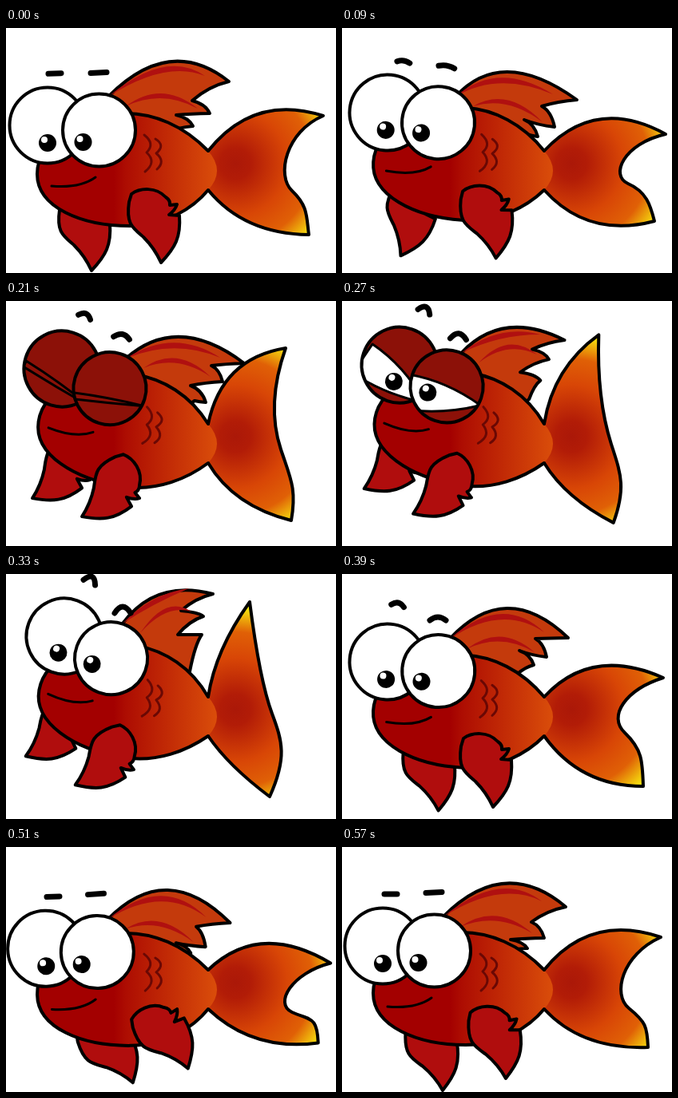
Write an HTML page with a canvas that moves like this. It is 413 by 307 pixels and loops after 600 ms.

```html
<!DOCTYPE html>
<html>
<head>
<meta charset="utf-8">
<title>Swimming fish</title>
<style>
html, body { margin: 0; width: 100%; height: 100%; overflow: hidden; background: #fff; }
canvas { display: block; }
</style>
</head>
<body>
<canvas id="stage" width="413" height="307"></canvas>
<script>
const ctx = document.getElementById('stage').getContext('2d');
const LOOP = 600, STEP = 30;
const times = [0, 90, 210, 330, 390, 450, 570];
const rows = text => text.trim().split('\n').map(r => r.trim().split(/\s+/).map(Number));

// One row per key time.
// body angle, mouth y | eyes x y angle | brow x y angle, twice | brow bend
const face = rows(`
  0   197  52   122   0   61 57 -2  116 56 -3  0
  4   181  57   106   6   77 42  8  131 48 10  2
  8.5 166  70    85  17   99 18 22  145 44 10  5
  10  159  73    78  20  106  7 25  146 45  0  8
  3   187  57   110   5   70 38 12  120 56  0  4
  -1  203  49   129  -3   57 64 -5  111 60 -5  0
  0   199  51   124   0   61 59  0  115 57 -3  0`);
// near fin x y angle, far fin x y angle
const fins = rows(`
  185 225   0   98 235   0
  180 220  -3   91 218  22
  148 225  57   86 202  57
  142 222  60   80 186  60
  180 223   0  108 228  -3
  189 218 -40  125 237 -40
  190 222  -5  111 237  -5`);
// start, crest, then tip and notch in turn, end
const dorsal = rows(`
  128 86  205  8  279  67  233  91  255 107  213 109  234 123  216 126
  142 86  200 22  294  90  250  98  266 124  228 115  245 136  231 133
  150 72  215 15  298  78  257  81  271 101  231 106  250 127  236 125
  146 62  187  6  259  25  219  46  247  53  215  76  245  76  230 122
  134 82  205  5  283  80  242  81  256 104  222  96  240 114  220 125
  130 92  200 18  281 107  239 103  248 131  216 122  231 136  224 134
  126 88  203 10  280  75  237  94  253 114  211 116  232 127  218 128`);
// upper bend, upper tip, rear edge, lower tip, lower bend
const tail = rows(`
  310  82  397 110  350 130  338 185  358 204  376 236  379 259  298 258
  318  85  405 133  352 145  335 185  358 195  386 222  391 242  308 264
  270  72  350  59  332 110  332 150  344 186  364 235  357 275  285 257
  262  95  305  35  312  90  320 140  333 175  352 230  330 279  278 240
  312  90  402 130  355 145  332 178  354 199  376 235  377 266  298 266
  325 100  411 173  365 174  332 208  356 212  393 205  395 243  316 261
  310  83  399 113  350 135  338 185  359 202  382 225  383 251  300 254`);

const finPath = new Path2D('M-31-7C-35 20-27 25-13 37Q1 51 9 69C27 50 34 37 32 10L19 9Q27 3 29-4L20-3Q21-9 15-13C3-26-17-25-28-17Z');
const scalePath = new Path2D('M-10-23Q4-12-7-1Q6 11-9 23M4-18Q17-10 5 0Q17 10 6 20');

const tailFill = ctx.createRadialGradient(287, 170, 0, 287, 170, 130);
[[0, '#ab1808'], [.15, '#b21c07'], [.5, '#d84606'], [.75, '#e06006'], [1, '#f8f010']]
  .forEach(s => tailFill.addColorStop(...s));
const bodyFill = ctx.createLinearGradient(135, 0, 262, 0);
[[0, '#a30000'], [.12, '#ad0d02'], [1, '#d94c0a']].forEach(s => bodyFill.addColorStop(...s));

// Monotone cubic interpolation around the loop.
function pose(keys, t) {
  const n = times.length;
  const at = i => times[(i + n) % n] + LOOP * Math.floor(i / n);
  let i = n - 1;
  while (times[i] > t) i--;
  const h = at(i + 1) - at(i), u = (t - at(i)) / h;
  return keys[0].map((_, c) => {
    const v = k => keys[(k + n) % n][c];
    const slope = k => (v(k + 1) - v(k)) / (at(k + 1) - at(k));
    const tangent = k => {
      const a = slope(k - 1), b = slope(k);
      return a * b <= 0 ? 0 : 2 * a * b / (a + b);
    };
    const w = u * u * (3 - 2 * u);
    return v(i) + (v(i + 1) - v(i)) * w
      + h * u * (1 - u) * ((1 - u) * tangent(i) - u * tangent(i + 1));
  });
}

function place(x, y, angle, draw) {
  ctx.save();
  ctx.translate(x, y);
  ctx.rotate(angle * Math.PI / 180);
  draw();
  ctx.restore();
}

function paint(path, fill, line, width = 4) {
  const p = typeof path === 'string' ? new Path2D(path) : path;
  if (fill) { ctx.fillStyle = fill; ctx.fill(p); }
  if (line) { ctx.strokeStyle = line; ctx.lineWidth = width; ctx.stroke(p); }
}

function disc(x, y, r, fill, line) {
  const p = new Path2D();
  p.arc(x, y, r, 0, 7);
  paint(p, fill, line);
}

const drawFin = (x, y, angle) => place(x, y, angle, () => paint(finPath, '#b00d0d', '#000'));

function drawDorsal(d) {
  const [sx, sy, cx, cy, tx, ty] = d;
  let path = `M${sx} ${sy}Q${cx} ${cy} ${tx} ${ty}`;
  for (let i = 4; i < d.length - 2; i += 2) {
    const [x, y, nx, ny] = d.slice(i, i + 4);
    const inward = nx < x;
    path += `Q${x + (nx - x) * (inward ? .55 : .75)} ${y + (ny - y) * .25} ${nx} ${ny}`;
  }
  paint(path + 'L215 140L180 140Z', '#c43a0c', '#000');
  const stripe = (x, y, ex, ey, bx, by, thick) =>
    paint(`M${x} ${y}Q${bx} ${by} ${ex} ${ey}Q${bx} ${by + thick} ${x} ${y}`, '#b01010');
  stripe(sx, sy, tx - 30, ty - 7, cx - 5, cy + 18, 14);
  const x = sx + 22, y = sy + 12, ex = d[8] - 15, ey = d[9] - 6;
  stripe(x, y, ex, ey, (x + ex) / 2, (y + ey) / 2 - 35, 12);
}

function drawTail([ax, ay, tx, ty, ...rest]) {
  const [bx, by, qx, qy] = rest.slice(-4);
  paint(`M253 154Q${ax} ${ay} ${tx} ${ty}C${rest.slice(0, 6).join(' ')}S${rest.slice(6, 8).join(' ')} ${bx} ${by}Q${qx} ${qy} 253 203`,
    tailFill, '#000');
}

// The body swings on the tail joint, which stays put.
function drawBody(angle) {
  const a = angle * Math.PI / 180, c = Math.cos(a), s = Math.sin(a);
  const p = (x, y) => `${255 + (x - 255) * c - (y - 178) * s} ${178 + (x - 255) * s + (y - 178) * c} `;
  const outline = 'M253 154C' + p(222, 122) + p(185, 107) + p(150, 107)
    + 'C' + p(90, 107) + p(39, 140) + p(39, 183)
    + 'C' + p(39, 225) + p(95, 248) + p(155, 248)
    + 'C' + p(200, 248) + p(235, 225) + '253 203';
  paint(outline + 'Q275 179 253 154', bodyFill);
  paint(outline, null, '#000');
  place(183, 157, angle, () => paint(scalePath, null, '#6a0804', 3));
}

function drawEye(x, y, r, px, py, lidY, lidAngle, gap) {
  ctx.save();
  ctx.translate(x, y);
  disc(0, 0, r, '#fff');
  disc(px, py, 11, '#000');
  disc(px - 4, py - 4, 4, '#fff');
  if (gap) {
    ctx.save();
    ctx.beginPath();
    ctx.arc(0, 0, r, 0, 7);
    ctx.clip();
    place(0, lidY, lidAngle, () => {
      const lens = new Path2D(`M-48 ${-gap}Q0 ${-gap} 48 2Q0 ${gap} -48 ${gap}Z`);
      const lid = new Path2D('M-99-99H99V99H-99Z');
      lid.addPath(lens);
      ctx.fillStyle = '#8c1108';
      ctx.fill(lid, 'evenodd');
      paint(lens, gap < 9 && '#8c1108', '#000', 3);
    });
    ctx.restore();
  }
  disc(0, 0, r, null, '#000');
  ctx.restore();
}

function draw(t) {
  const [tilt, mouthY, ex, ey, turn, x1, y1, r1, x2, y2, r2, bend] = pose(face, t);
  const fin = pose(fins, t);
  const gap = t >= 180 && t <= 240 ? 4 : t === 150 || t === 270 ? 22 : 0;
  ctx.fillStyle = '#fff';
  ctx.fillRect(0, 0, 413, 307);
  ctx.lineCap = ctx.lineJoin = 'round';

  drawFin(...fin.slice(3));
  drawDorsal(pose(dorsal, t));
  drawTail(pose(tail, t));
  drawBody(tilt);
  place(85 - turn * .28, mouthY, turn, () => paint('M-28 1Q8 4 27-10', null, '#000', 3));
  drawFin(...fin.slice(0, 3));
  place(ex, ey, turn, () => {
    drawEye(0, 0, 47.5, 0, 22, 20, 15, gap);
    drawEye(64.5, 6, 45.5, -20, 15, 15, -10, gap);
  });
  const brow = (x, y, angle, w) => place(x, y, angle, () =>
    paint(`M${-w} ${bend / 2}Q0 ${-bend * 1.5} ${w} ${bend / 2}`, null, '#000', 7));
  brow(x1, y1, r1, 8);
  brow(x2, y2, r2, 10);
}

const start = performance.now();
function frame() {
  const t = (performance.now() - start) % LOOP;
  draw(Math.floor(t / STEP) * STEP);
  requestAnimationFrame(frame);
}
frame();
</script>
</body>
</html>
```
